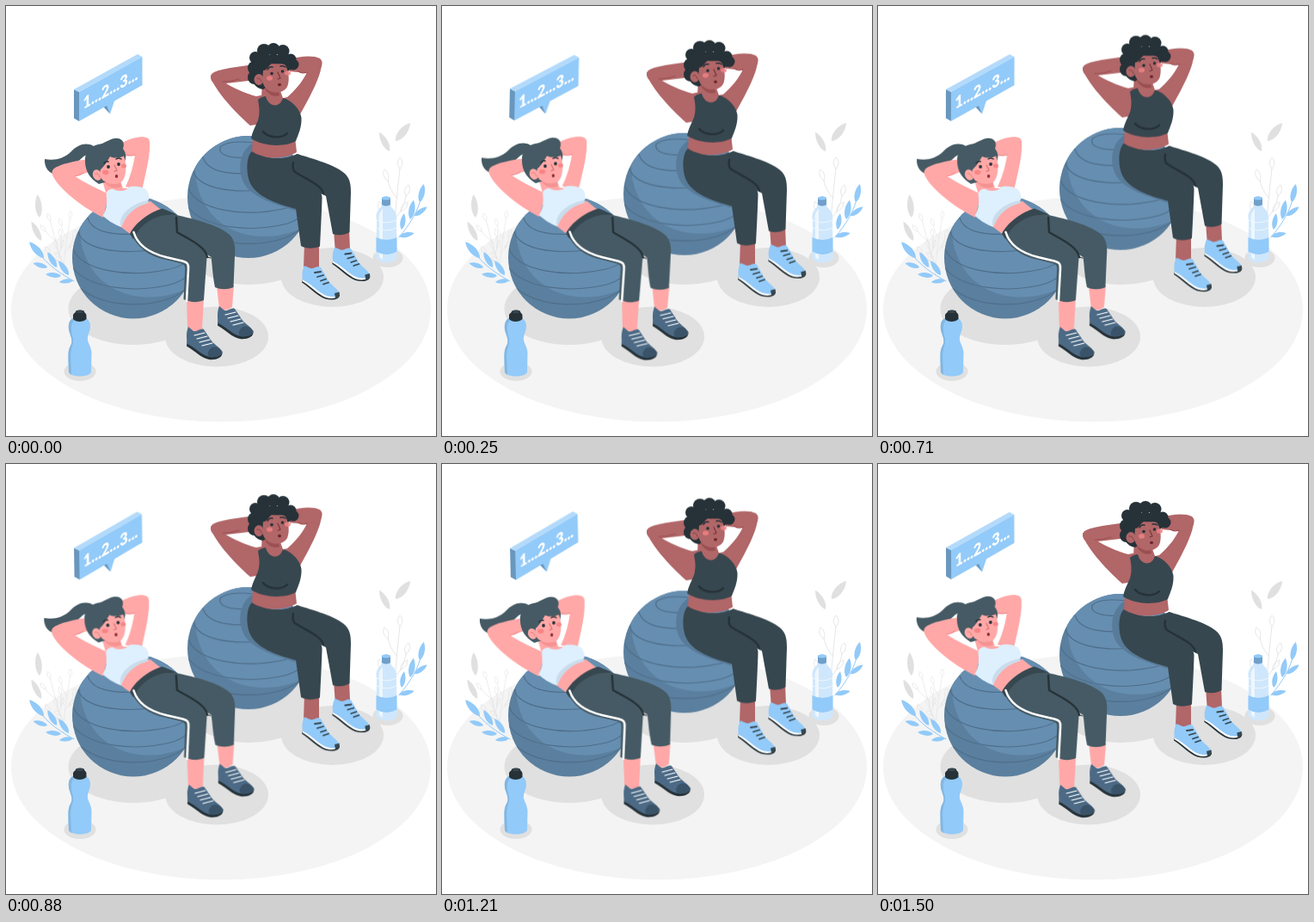
Animation of 500x500 px, one loop 1540 ms. Source, as an HTML page:

```html
<!DOCTYPE html>
<html lang="en">
<head>
<meta charset="utf-8">
<title>Ball crunches</title>
<style>
html, body { margin: 0; width: 100%; height: 100%; overflow: hidden; background: #fff; }
svg { display: block; width: 100%; height: 100%; }
.lift { animation: lift 1540ms linear infinite; }
.rock, .sway { animation: rock 1540ms ease-in-out infinite; }
.rock { --turn: .72deg; transform-origin: 190px 272px; }
.sway { --turn: 1.5deg; transform-origin: 119px 95px; }
@keyframes lift {
  0%, 97.5%, 100% { transform: translateY(0); }
  47.5% { transform: translateY(-9.7px); }
}
@keyframes rock {
  0%, 100% { transform: rotate(0deg); animation-timing-function: ease-out; }
  23% { transform: rotate(var(--turn)); }
  73% { transform: rotate(calc(var(--turn) * -1)); animation-timing-function: ease-in; }
}
.line { fill: none; stroke-linecap: round; stroke-linejoin: round; }
.blue { fill: #92caf9; }
.gray { fill: #e0e0e0; }
.seam { stroke: #4e6e8a; stroke-width: 1.1; }
.twig { stroke: #e0e0e0; stroke-width: .8; }
.ink { fill: #263238; }
.slate { fill: #37474f; }
.pants { fill: #455a64; }
.dark { fill: #b16668; }
.darker { fill: #9a4f51; }
.pink { fill: #ffa8a7; }
.rose { fill: #f59292; }
.fold { stroke: #263238; stroke-width: 2.4; }
</style>
</head>
<body>
<svg viewBox="0 0 500 500">
<defs>
  <path id="leaf" d="M0 0C-4-4-3.500-13 0-18C3.500-13 4-4 0 0Z"/>
  <clipPath id="round"><circle r="71"/></clipPath>
  <g id="ball">
    <circle r="71" fill="#5b7f9e"/>
    <g clip-path="url(#round)">
      <path d="M-62-36C-63 7-34 44 14 46C40 47 60 39 75 29V-75H-40Z" fill="#668eb0"/>
      <g class="line seam">
        <path d="M-33-58C-36-48-20-44 6-46C20-48 24-56 14-61C2-65-25-66-33-58Z"/>
        <path d="M-53-46C-48-30-24-25 10-28C35-30 46-38 50-48"/>
        <path d="M-64-30C-59-11-22-3 24-9C48-13 60-22 64-30"/>
        <path d="M-70-10C-60 15-8 24 40 14C58 10 66 3 71-4"/>
        <path d="M-70 12C-52 36 2 42 45 31C58 27 65 21 70 13"/>
        <path d="M-61 36C-36 57 12 59 44 47C54 43 58 40 61 36"/>
      </g>
    </g>
  </g>
  <g id="sprig" class="line twig">
    <path d="M0 0C-2-25 2-58 6-96M-1-20C-8-26-12-34-14-44M0-38C7-44 11-53 13-64M2-62C-3-68-6-74-8-82"/>
    <path d="M6-96c-4-5-3-9 0-13c4 4 4 9 0 13M-14-44c-6-4-6-9-4-14c5 4 6 9 4 14M13-64c-3-6-1-10 3-13c3 5 1 10-3 13M-8-82c-6-4-6-9-4-13c5 4 6 8 4 13M-6-28c-7 0-10-3-12-8c6 0 10 3 12 8M7-46c0-6 3-9 8-11c0 6-3 9-8 11"/>
  </g>
  <g id="trainer">
    <path class="ink" d="M345 317L344 321.500C354 328 362 337 371 340.500C380 343 389 341 388 335Z"/>
    <path fill="#fff" d="M345 315L344.500 320C354 325.500 363 335.500 372 339C380 341.500 388 339 387.500 334Z"/>
    <path class="blue" d="M347 302C344 308 344 314 345 318.500C355 323 364 334 373 337C380 339 388 338 387.500 333.500C384 327 378 325 374 318L366 304C362 301 359 306 354 305Z"/>
    <path class="slate" d="M382 334L387.500 332.500C388.500 336 387 339 383 339.500Z"/>
    <path class="line" stroke="#37474f" stroke-width="1.800" d="M359 310L366 309M362 315L369 313M366 319.500L372 317.500M369 323.500L375 321.500"/>
  </g>
  <g id="sneaker">
    <path class="ink" d="M211 386L210 395.500C220 401 226 409 236 411C244 412 252 409 251.500 403Z"/>
    <path fill="#4c6a85" d="M212 373C209 380 210 388 211 393C220 397 227 406 237 408C245 409 252 406 251.500 402C248 396 241 393 238 388L230 376C226 374 223 379 218 378Z"/>
    <path fill="#3a5368" d="M237 399C241 394 248 396 251.500 402C251 407 243 409 237 408C234 406 234 403 237 399Z"/>
    <path class="line" stroke="#fff" stroke-width="1.100" d="M219 383L231 380M222 387L234 384M225 391L237 388M228 395L240 392"/>
  </g>
</defs>

<rect width="500" height="500" fill="#fff"/>
<ellipse cx="250" cy="352.500" rx="244" ry="131" fill="#f4f4f4"/>
<g class="gray">
  <ellipse cx="148" cy="352" rx="75.500" ry="42"/>
  <ellipse cx="245" cy="384.500" rx="60" ry="35"/>
  <ellipse cx="283" cy="282" rx="74" ry="42"/>
  <ellipse cx="379.500" cy="315.500" rx="59.500" ry="34.500"/>
  <ellipse cx="86" cy="425" rx="18.500" ry="11"/>
  <ellipse cx="444" cy="293" rx="17.500" ry="11"/>
</g>

<!-- plants -->
<use href="#sprig" transform="translate(452 285)"/>
<use href="#sprig" transform="translate(71 312) rotate(-21) scale(.68)"/>
<use href="#sprig" transform="translate(67 312) rotate(3) scale(.68)"/>
<g class="gray">
  <use href="#leaf" transform="translate(39 246) rotate(-5) scale(1.350 1.500)"/>
  <use href="#leaf" transform="translate(41 273) rotate(-27) scale(1.200 1.400)"/>
  <use href="#leaf" transform="translate(453 157) rotate(39) scale(1.600 1.500)"/>
  <use href="#leaf" transform="translate(446 169) rotate(-28) scale(1.300 1.400)"/>
</g>
<g class="line" stroke="#92caf9" stroke-width="1">
  <path d="M79 320C65 312 48 302 36 284M457 269C470 253 479 240 484 218"/>
</g>
<g class="blue">
  <use href="#leaf" transform="translate(44 293) rotate(-42) scale(1.400)"/>
  <use href="#leaf" transform="translate(48 304) rotate(-73) scale(.95)"/>
  <use href="#leaf" transform="translate(59 304) rotate(-31) scale(1.150)"/>
  <use href="#leaf" transform="translate(64 314) rotate(-83)"/>
  <use href="#leaf" transform="translate(73 313) rotate(-35) scale(1.150)"/>
  <use href="#leaf" transform="translate(78 319) rotate(-97) scale(.9)"/>
  <use href="#leaf" transform="translate(481 228) rotate(13) scale(1.200)"/>
  <use href="#leaf" transform="translate(475 244) rotate(54)"/>
  <use href="#leaf" transform="translate(470 248) rotate(10) scale(1.250)"/>
  <use href="#leaf" transform="translate(460 260) rotate(9) scale(1.050)"/>
  <use href="#leaf" transform="translate(457 268) rotate(77)"/>
</g>

<!-- water bottle -->
<path fill="#cfe7fc" d="M437 230L436 234C431 238 429.500 243 431 249L430.500 293C434 300 451 300 454.500 293L454 249C455 243 453 238 448 234L447 230Z"/>
<path fill="#eef7fe" d="M438 236C434 240 433 244 434 250V292L438 295V250Z"/>
<path class="blue" d="M430.500 269q12 6 24 0v16.500q-12 7-24 0z"/>
<path class="line" stroke="#eef7fe" d="M431 249q11.500 6 23 0M431 258q11.500 6 23 0"/>
<path fill="#6f9fca" d="M437 223q5-3 10 0v8q-5 3-10 0z"/>
<ellipse cx="442" cy="223.500" rx="5" ry="2" class="blue"/>

<!-- back woman -->
<g class="lift">
  <use href="#ball" transform="translate(282 222)"/>
  <path fill="#587b99" d="M286 160C270 170 268 196 280 211C295 227 320 232 336 238L340 230L292 170Z"/>

  <path class="dark" d="M290 68C272 70 250 73 242 77C236 80 237 87 243 91L256 90L290 86Z"/>
  <path class="dark" d="M238 80C238 92 264 122 284 139L297 137L301 103L291 105C279 102 264 95 252 88Z"/>
  <path class="dark" d="M330 62C342 58 358 57 365 61C370 65 367 72 362 78L350 78L330 76Z"/>
  <path class="dark" d="M367 63C369 78 352 108 342 126L330 132L318 108L327 106C336 98 345 88 350 77C359 77 364 70 367 63Z"/>
  <path class="line" stroke="#9a4f51" stroke-width="1.200" d="M252 88Q262 88 271 85M350 77Q344 79 340 76"/>

  <path class="dark" d="M347 276L346 305C350 309 360 309 364 303L364 277ZM381 260L383 288C389 290 395 287 400 283L399 259Z"/>
  <use href="#trainer"/>
  <use href="#trainer" transform="translate(35.300 -21.500)"/>

  <path class="dark" d="M287 150L286 171C302 179 326 178 338 170L336 152Z"/>
  <path class="slate" d="M286 169C302 179 325 180 339 172C350 176 380 183 393 194C400 200 401 207 401 217L399.500 263C393 267 386 267 380 265L372 221L360 215Z"/>
  <path class="slate" d="M286 169C279 175 279 195 284 206C292 224 323 232 337 236L343 279C350 283 359 282 365 279.500C366 262 367 240 367.500 224C369 214 355 205 340 194L339 172C322 180 300 179 286 169Z"/>
  <path class="line fold" d="M334 182C333 187 333 190 336 193C350 202 367 208 369 218"/>

  <path class="dark" d="M298 88L297 107L304 120L324 121L322 107L318 96Z"/>
  <path class="darker" d="M300 95C306 105 313 106 318 104L317 97Z"/>
  <path class="slate" d="M293 109C296 106 300 105 302 105C305 117 318 120 322 107C331 109 342 119 343.500 130C344 141 340 149 337 157C325 164 300 164 285 154C286 147 290 140 293 133C296 123 294 115 293 109Z"/>
  <path class="line fold" stroke-width="1.500" d="M299 146C304 153 320 155 327 148"/>

  <g class="ink">
    <circle cx="290" cy="60" r="7"/><circle cx="300" cy="52" r="8"/>
    <circle cx="311" cy="50.500" r="7.500"/><circle cx="322" cy="52.500" r="7.500"/>
    <circle cx="331" cy="62" r="6.500"/><circle cx="334" cy="68" r="6.500"/>
    <circle cx="289" cy="72" r="8"/><circle cx="289" cy="83" r="8"/>
    <path d="M291 57H328L332 73L299 97C290 96 284 88 286 76Z"/>
  </g>
  <path class="dark" d="M299 75C304 75 305 69 309 67C316 68 322 66 325 69C329 76 330 87 327 94C323 101 313 102 307 99C302 97 299 92 298 87Z"/>
  <ellipse cx="294" cy="85.500" rx="5.500" ry="6.500" class="dark"/>
  <path class="line" stroke="#8a4245" stroke-width="1" d="M292 84Q296 83 297 88"/>
  <path fill="#ee8385" opacity=".85" d="M303 84a3.500 2.700 0 1 0 7 0a3.500 2.700 0 1 0-7 0M324 78a3.500 2.700 0 1 0 7 0a3.500 2.700 0 1 0-7 0"/>
  <circle cx="309" cy="78.500" r="1.800" class="ink"/><circle cx="321.500" cy="76" r="1.800" class="ink"/>
  <path class="line" stroke="#263238" stroke-width="1.500" d="M304 74Q306 70 310 71M319 70Q322 69 325 71"/>
  <path class="line" stroke="#743437" stroke-width="1.100" d="M316 77L319 84L316 85"/>
  <ellipse cx="318" cy="91.500" rx="2" ry="1.700" fill="#6b272d"/>
</g>

<!-- front ball -->
<use href="#ball" transform="translate(148 292.500)"/>

<!-- front woman -->
<g class="rock">
  <path class="pants" d="M102 163C93 158 84 161 76 169C67 178 56 180 45 178C44 187 50 196 60 196C74 196 80 184 88 177C93 172 99 172 101 170Z"/>
  <path class="pink" d="M97 178C80 180 62 184 56 189C51 194 55 202 63 203L80 198L97 193Z"/>
  <path class="pink" d="M53.500 193C54 207 88 234 113 246L120 219C106 212 92 206 80 198C70 198 60 195 60 187Q54 189 53.500 193Z"/>
  <path class="pink" d="M135 159C146 153 160 150 165 154C170 159 165 169 160 173L135 175Z"/>
  <path class="pink" d="M166 155C170 167 162 196 158 215L139 210C144 200 148 187 150 173C158 172 163 164 163 153Z"/>
  <path class="line" stroke="#f08a8a" stroke-width="1.200" d="M80 198Q86 197 90 194M150 173Q145 175 141 173"/>

  <path class="pink" d="M210 340L211 374C216 379 225 379 228 376L230 340ZM245 325L248 352C253 355 259 353 263 350L265 325Z"/>
  <use href="#sneaker"/>
  <use href="#sneaker" transform="translate(36 -24)"/>

  <path class="pink" d="M131 255C137 241 153 229 168 227L184 240C168 244 152 256 147 267Z"/>
  <path class="pants" d="M146 265C152 253 168 241 183 237L200 243.500C225 249 251 256.500 261 267C266 273 267 281 266 291L264.500 327C257 330 250 330 243 327C240 312 240 302 238.500 292L228 285Z"/>
  <path class="pants" d="M145 264C152 280 165 291 186 295L204 299.500C208 301 208.500 303 208 308L206.500 341C214 345 224 345 230 342L233.500 293C232 280 214 274 199 264L197 243L183 237C168 240 152 252 145 264Z"/>
  <path class="slate" d="M144 265C150 252 168 239 182 235.500L199 242.500L187 243C171 244 154 257 151 267L148 271Z"/>
  <path class="line fold" d="M198 246L199 263C210 270 232 279 234 292"/>
  <path class="line" stroke="#263238" stroke-width="1" d="M234 292L238 293"/>
  <path class="line" stroke="#fff" stroke-width="2.600" stroke-linecap="butt" d="M148.500 263C153 278 166 287 186 292L205 296.500C211 298 212.500 300 212 306L210 343"/>

  <path class="pink" d="M111 199L116 217C124 222 136 221 144 212L136 212L133 203Z"/>
  <path class="rose" d="M115 205C120 212 128 213 134 210L133 205Z"/>
  <path fill="#deeffd" d="M116.500 219C117 215 120 213 124 212.500C131 217 140 215 144 210C153 209 162 211 164 215C168 222 166 228 162 230C149 233 139 243 134 257C125 254 117 248 112.500 244C117 237 118 229 116.500 219Z"/>
  <path fill="#c9dcec" d="M134 257C129 246 143 230 165 226L166 229C151 232 139 243 134 257Z"/>

  <path class="pants" d="M92 181C91 170 98 163 107 161C115 160 119 155 126 154C134 153 139 158 136 166C140 171 140 176 138 181L118 204L108 207C98 201 92 192 92 181Z"/>
  <path class="pink" d="M110 190C114 187 118 180 121 175C127 178 133 176 137 174.500C140 182 141 197 135 204C129 209 118 207 113 203C109 199 109 193 110 190Z"/>
  <ellipse cx="106" cy="196.500" rx="5" ry="6.500" class="pink" transform="rotate(-20 106 196.500)"/>
  <path class="line" stroke="#e27f80" stroke-width="1" d="M104 195Q108 194 109 199"/>
  <path fill="#f5787b" opacity=".75" d="M112 193.500a3.700 2.700 0 1 0 7.400 0a3.700 2.700 0 1 0-7.400 0M134 186a3 2.500 0 1 0 6 0a3 2.500 0 1 0-6 0"/>
  <circle cx="119" cy="187" r="1.900" class="ink"/><circle cx="131" cy="184" r="1.900" class="ink"/>
  <path class="line" stroke="#263238" stroke-width="1.400" d="M114 183Q116 180 119 181M128 178Q131 176 134 178"/>
  <path class="line" stroke="#d96d70" stroke-width="1.100" d="M126 185L129 191L126 192.500"/>
  <ellipse cx="128.500" cy="198" rx="1.700" ry="2" fill="#8d3038"/>
</g>

<!-- sports bottle -->
<path class="blue" d="M78 363C72 366 72 374 74 380C76 386 78 390 75 395C72 400 72.500 406 72.500 412L73 426C76 432 96 432 99 426L99.500 403C99 395 94 391 95 385C96 380 98 377 98 372C98 367 95 364 93 363Z"/>
<path fill="#83b6e0" d="M78 363C72 366 72 374 74 380C76 386 78 390 75 395C72 400 72.500 406 72.500 412L73 426L76 429L75 408C75 398 79 393 78 387C76 379 74 370 79 366Z"/>
<path class="ink" d="M78 360C78 357 81 357 81 355C83 353 89 353 91 355C91 357 93.500 357 93.500 360V364C90 368 81 368 78 364Z"/>
<ellipse cx="86" cy="355.500" rx="4" ry="1.500" fill="#37474f"/>

<!-- speech bubble -->
<g class="sway">
  <path fill="#6997bd" d="M79 97L85 100V134L79 130.500ZM113 117L121 125.500L118 114Z"/>
  <path fill="#b3dafb" d="M79 97L153 56L158.500 59L85 100Z"/>
  <path class="blue" d="M85 100L158.500 59V92L126 110.500L121 125.500L117 116L85 134Z"/>
  <text transform="matrix(.866 -.475 0 1 89.500 120.200)" font-family="Lato, sans-serif" font-weight="900" font-size="19" fill="#fff">1...2...3...</text>
</g>
</svg>
</body>
</html>
```
